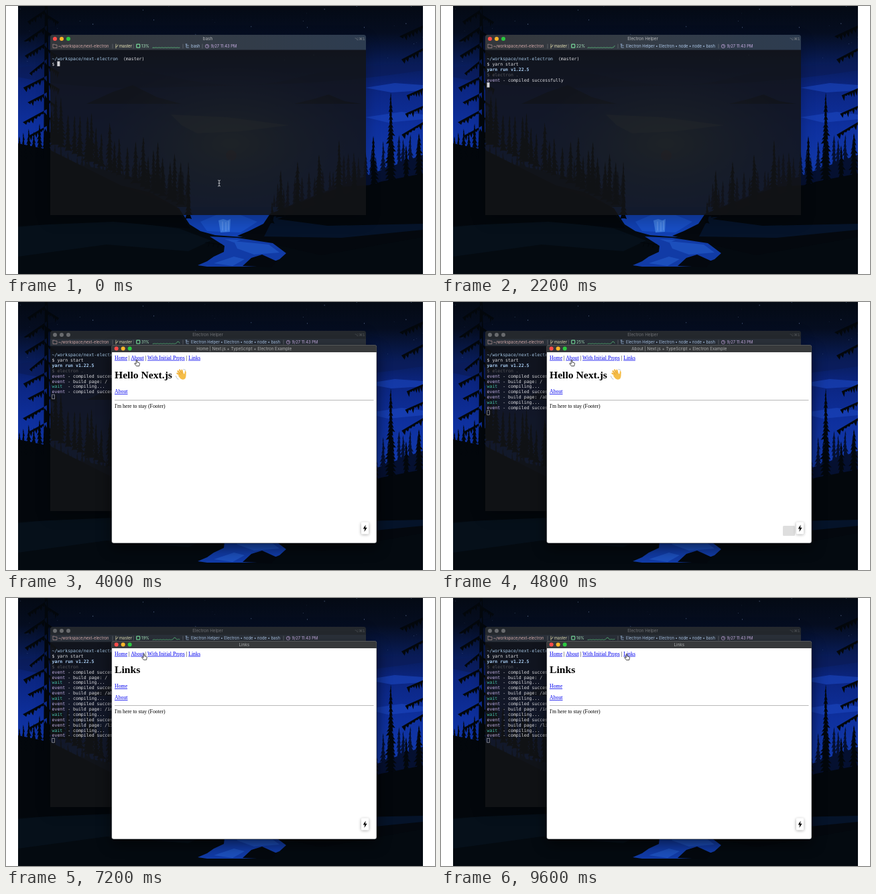
Write an HTML page that moves like this. It is 640 px wide and 400 px high and loops after 9.8 s.

```html
<!DOCTYPE html>
<html lang="en">
<head>
<meta charset="utf-8">
<title>Desktop app demo</title>
<style>
html, body { margin: 0; width: 100%; height: 100%; overflow: hidden; background: #fff; }
svg { display: block; width: 640px; height: 400px; }
text { white-space: pre; }
.ui { font: 6.25px Inter, sans-serif; }
.bar { font: 5.85px Inter, sans-serif; }
.keys { font: 5.6px "DejaVu Sans", sans-serif; }
.mono { font: 6.56px "DejaVu Sans Mono", monospace; fill: #dcdce0; }
.page { font: 7.82px "Liberation Serif", Times, serif; fill: #000; }
.h1 { font: bold 15.64px "Liberation Serif", Times, serif; fill: #000; }
.link { fill: #0000ee; text-decoration: underline; }
.b { font-weight: bold; }
.mid { text-anchor: middle; }
</style>
</head>
<body>
<svg viewBox="0 0 640 400">
  <defs>
    <linearGradient id="sky" x2="0" y2="1">
      <stop offset="0" stop-color="#040a14"/>
      <stop offset=".1" stop-color="#050d20"/>
      <stop offset=".2" stop-color="#081a50"/>
      <stop offset=".3" stop-color="#0b2580"/>
      <stop offset=".45" stop-color="#0e309e"/>
      <stop offset=".8" stop-color="#1644ba"/>
    </linearGradient>
    <linearGradient id="title">
      <stop offset="0" stop-color="#34373b"/>
      <stop offset=".5" stop-color="#343c46"/>
      <stop offset="1" stop-color="#2d3c50"/>
    </linearGradient>
    <radialGradient id="glow">
      <stop offset="0" stop-color="#7b9484" stop-opacity=".75"/>
      <stop offset="1" stop-color="#54707c" stop-opacity="0"/>
    </radialGradient>
    <filter id="soft" x="-30%" y="-30%" width="160%" height="160%"><feGaussianBlur stdDeviation="11"/></filter>
    <filter id="near" x="-60%" y="-60%" width="220%" height="220%"><feGaussianBlur stdDeviation="2"/></filter>
    <clipPath id="desk"><path d="M18 0H622V400H18Z"/></clipPath>
    <clipPath id="outside"><path clip-rule="evenodd" d="M18 0H622V400H18ZM66 43H537V312H66Z"/></clipPath>
  </defs>
  <g clip-path="url(#desk)">
    <g id="wall"></g>
    <g clip-path="url(#outside)"><rect x="66" y="51" width="471" height="268" opacity=".25" filter="url(#soft)"/></g>
    <g id="term"></g>
    <g id="app"></g>
    <g id="mouse"></g>
  </g>
</svg>
<script>
const LOOP = 9800, STEP = 200;
const $ = id => document.getElementById(id);
const text = (x, y, s, cls, fill) =>
  `<text x="${x}" y="${y}" class="${cls}"${fill ? ` style="fill:${fill}"` : ''}>${s}</text>`;
const span = (s, fill, cls = '') => `<tspan class="${cls}"${fill ? ` style="fill:${fill}"` : ''}>${s}</tspan>`;
const path = (d, fill, extra = '') => `<path d="${d}" fill="${fill}" ${extra}/>`;
const line = (d, color, w = .7) => path(d, 'none', `stroke="${color}" stroke-width="${w}" stroke-linecap="round" stroke-linejoin="round"`);
const rect = (x, y, w, h, fill, extra = '') => `<rect x="${x}" y="${y}" width="${w}" height="${h}" fill="${fill}" ${extra}/>`;
const dot = (x, y, r, fill) => `<circle cx="${x}" cy="${y}" r="${r}" fill="${fill}"/>`;
// Latest value in a list of [time, value]
const at = (keys, t) => keys.filter(k => k[0] <= t).pop()[1];

function random(seed) {
  return () => (seed = seed * 16807 % 2147483647) / 2147483647;
}

// ---- wallpaper ----
const DARK = '#03070c';

function tree(x, top, foot, half, rnd) {
  const n = Math.max(5, Math.round((foot - top) / 6)), left = [], right = [];
  for (let k = 1; k <= n; k++) {
    const y = top + (foot - top) * k / n, r = half * (k / n) ** .8;
    const a = r * (.5 + rnd() * .7), b = r * (.5 + rnd() * .7);
    left.push(`${(x - a).toFixed(1)} ${y.toFixed(1)}`, `${(x - a * .4).toFixed(1)} ${(y - 1).toFixed(1)}`);
    right.unshift(`${(x + b * .4).toFixed(1)} ${(y - 1).toFixed(1)}`, `${(x + b).toFixed(1)} ${y.toFixed(1)}`);
  }
  return `M${x.toFixed(1)} ${top.toFixed(1)}L${left.join('L')}L${right.join('L')}Z`;
}

function forest(x0, x1, ground, h, gap, fill, seed) {
  const rnd = random(seed);
  let d = '';
  for (let x = x0; x < x1; x += gap * (.6 + rnd() * .8)) {
    const tall = h * (.6 + rnd() * .6), y = ground(x);
    d += tree(x, y - tall, y + 14, 3 + tall * .09, rnd);
  }
  return path(d, fill);
}

// Drooping branch with ragged needles below
function bough(x, y, dx, dy, rnd) {
  let d = `M${x} ${y}L${x + dx} ${y + dy}`;
  for (let k = 6; k > 0; k--) {
    const px = x + dx * k / 7, py = y + dy * k / 7;
    d += `L${px.toFixed(1)} ${(py + 4 + rnd() * 7).toFixed(1)}L${(px - dx * .05).toFixed(1)} ${(py + 2).toFixed(1)}`;
  }
  return d + `L${x} ${y + 9}Z`;
}

function wallpaper() {
  const rnd = random(77);
  let s = rect(18, 0, 604, 400, 'url(#sky)');
  for (let i = 0; i < 46; i++)
    s += dot(18 + rnd() * 604, rnd() ** 1.6 * 105, .25 + rnd() * .4, `rgba(150,180,230,${.25 + rnd() * .5})`);
  s += path('M18 92Q130 78 240 104T430 108T622 86V96Q520 112 420 116T210 122T18 106Z', '#0a1c58', 'opacity=".6"');
  s += path('M120 146L160 128L189 118L225 136L262 146ZM430 146L462 138L481 132L505 142L530 146Z', '#051030', 'opacity=".8"');
  s += path('M536 122L580 115L622 118V126L575 129ZM536 166L590 158L622 162V169L570 174Z', '#1b46c0', 'opacity=".6"');
  s += '<ellipse cx="335" cy="205" rx="200" ry="115" fill="url(#glow)"/>';
  s += path('M246 162L330 166L422 178L350 187L285 190L262 178Z', '#9aab9b', 'opacity=".35"');
  s += dot(336, 223, 8, 'rgba(150,90,85,.35)');
  s += forest(18, 275, x => 230 + (x - 18) * .2, 30, 7, '#071434', 9);
  s += path('M18 225Q150 235 275 285V330H18Z', '#071434');
  s += forest(400, 622, x => 302 - (x - 400) * .36, 36, 8, '#051030', 31);
  s += path('M390 312Q450 285 622 222V320H390Z', '#051030');

  // Waterfall and river
  s += path('M255 300H410V350H255Z', '#1140b2');
  s += path('M290 322L318 310L350 312L375 322L350 338L300 336Z', '#1c55cc', 'opacity=".7"');
  s += path('M317 320L324 318L330 320L335 318L334 337L320 338Z', '#3b78de');
  s += line('M323 322V335M328 323V336M332 321V334', '#6f9fee', .8);
  s += path('M18 262L130 258L215 278L258 302L274 326L290 336L312 342L420 350L622 330V400H18Z', '#040a10');
  s += path('M394 310L384 325L362 336L345 343L470 372L622 345V262L500 270Z', '#04080e');
  s += path('M400 314H540L622 320V334L500 346L385 344Z', '#061732', 'opacity=".75"');
  s += path('M18 330L140 318L258 332L306 350L272 366L150 356L18 374Z', '#06101a');
  s += path('M304 344L345 346L398 354L418 369L408 378L380 389L300 389L286 387L300 381L310 374L325 367L326 358Z', '#113ba6');
  s += path('M340 351L392 356L408 368L370 371L345 362ZM310 384L340 374L356 378L338 388ZM326 348L350 349L340 353Z', '#2257c6', 'opacity=".7"');
  s += path('M353 388L366 376L382 371L404 381L396 390Z', '#04080e');
  s += line('M298 353L322 356M302 358L303 353M309 359L310 354M316 360L317 355', DARK, 1.2);

  // Near trees
  s += forest(68, 266, x => 190 + (x - 66) * .48, 58, 9, DARK, 15);
  const firs = [[272, 232, 318, 6], [410, 245, 316, 8], [435, 232, 318, 10], [467, 222, 318, 12], [397, 292, 325, 4],
    [497, 200, 318, 11], [520, 234, 318, 11], [548, 194, 300, 11], [574, 129, 300, 12], [597, 208, 300, 12], [616, 190, 300, 14]];
  for (const [x, top, foot, half] of firs) s += path(tree(x, top, foot, half, rnd), DARK);
  s += path('M18 205L66 215L180 272L250 298L275 332L160 322L18 328ZM622 250L560 262L480 290L405 318L480 328L622 325Z', DARK);
  s += forest(20, 66, () => 215, 34, 8, DARK, 5);

  // Branches framing both edges
  let frame = 'M58 0L62 0L66 230H56Z';
  for (let y = 4; y < 200; y += 25) frame += bough(61, y, -24 - rnd() * 12, 14 + rnd() * 10, rnd) + bough(60, y + 8, 14 + rnd() * 8, 12, rnd);
  for (const y of [28, 62, 122, 148, 172]) frame += bough(624, y, -22 - rnd() * 16, 10 + rnd() * 10, rnd);
  return s + path(frame, DARK);
}

// ---- terminal ----
const OPEN = 2600, ROW = 7.9, CHAR = 3.95;
const cpu = [[0, 13], [1000, 22], [2600, 46], [3800, 31], [4600, 25], [5800, 18], [7000, 19], [8000, 17], [9200, 16]];
const output = [
  [1200, span('yarn run v1.22.5', '#a9cdf2', 'b')],
  [1400, span('$ electron .', '#56565c')],
  [2200, 'event', 'compiled successfully'],
  [2600, 'event', 'build page: /'],
  [2600, 'wait ', 'compiling...'],
  [2800, 'event', 'compiled successfully'],
  [4200, 'event', 'build page: /about'],
  [4200, 'wait ', 'compiling...'],
  [4600, 'event', 'compiled successfully'],
  [5400, 'event', 'build page: /initial-props'],
  [5400, 'wait ', 'compiling...'],
  [5600, 'event', 'compiled successfully'],
  [6400, 'event', 'build page: /links'],
  [6400, 'wait ', 'compiling...'],
  [6800, 'event', 'compiled successfully']
];

function lights(x, y, on) {
  return ['#fc4b48', '#fdb528', '#2bc840'].map((c, i) => dot(x + i * 10, y, 3, on ? c : '#696b6e')).join('');
}

function spark(t) {
  let d = 'M219 62.7';
  for (let i = 0; i <= 24; i++) {
    const s = Math.floor(t / 1000) + i - 24;
    const load = .35 + .3 * Math.sin(s * 2.3) + 4 * Math.exp(-((s - 2.4) ** 2) / .7) + (s > 2 ? .5 : 0);
    d += `L${(219 + i * 1.67).toFixed(1)} ${(62.5 - load).toFixed(1)}`;
  }
  return line(d, '#63cf86', .7);
}

function statusBar(t) {
  const busy = t >= 1600, end = busy ? 414 : 293;
  let s = rect(66, 55, 471, 10.5, t < OPEN ? 'url(#title)' : '#2b313a');
  s += line('M70 58V62.5H76V58H73L72.3 57.2H70Z', '#c8a3a3', .6) + text(78, 62, '~/workspace/next-electron', 'bar', '#d3a9a8');
  s += line('M164 57V63M164 61Q167 61 167 58', '#e6dfad', .7) + text(169, 62, 'master', 'bar', '#f0ebbd');
  s += rect(194.7, 57.2, 5, 5, 'none', 'rx=".7" stroke="#78d99a" stroke-width="1.2"');
  s += text(202, 62, at(cpu, t) + '%', 'bar', '#b1efc5') + spark(t);
  s += line('M269 57V62H272.5M269 59H272.5M268 57H270', '#a4c1e6', .7);
  s += text(276, 62, busy ? 'Electron Helper • Electron • node • node • bash' : 'bash', 'bar', '#afc9ea');
  s += `<circle cx="${end + 7}" cy="60" r="2.7" fill="none" stroke="#c5a5dd" stroke-width=".7"/>`;
  s += line(`M${end + 7} 58.4V60H${end + 8.3}`, '#c5a5dd', .6) + text(end + 12.5, 62, '9/27 11:43 PM', 'bar', '#cdb2e8');
  for (const x of [159, 190, 264, end]) s += line(`M${x} 57V63`, '#777b80', .6);
  return s;
}

function terminal(t) {
  const active = t < OPEN, typed = 'yarn start'.slice(0, Math.round(t / 100));
  let s = rect(66, 64, 471, 248, '#131417', 'opacity=".86"');
  s += path('M66 56V46.5Q66 43 69.5 43H533.5Q537 43 537 46.5V56Z', active ? 'url(#title)' : '#24282d');
  s += lights(73, 49, active);
  s += text(301, 51.4, t < 1600 ? 'bash' : 'Electron Helper', 'ui mid', active ? '#b9bbbe' : '#707276');
  s += text(520, 51, '⌥⌘1', 'keys', active ? '#85888c' : '#55585c') + statusBar(t);

  const rows = [span('~/workspace/next-electron', '#a8c9e8') + '  (master)', '$ ' + typed];
  for (const [when, tag, msg] of output) if (t >= when)
    rows.push(msg ? span(tag, tag === 'event' ? '#c3b1e4' : '#48bca7') + ' - ' + msg : tag);
  s += rows.map((r, i) => text(68.5, (81 + i * ROW).toFixed(1), r, 'mono')).join('');
  const prompt = rows.length === 2;
  const x = 68.5 + (prompt ? (2 + typed.length) * CHAR : 0);
  const y = 74.6 + (prompt ? 1 : rows.length) * ROW;
  return s + (active
    ? rect(x, y, 4, 7.4, '#d4d4d8')
    : rect(x + .3, y + .4, 3.5, 6.5, 'none', 'stroke="#b8b8bc" stroke-width=".6"'));
}

// ---- app window ----
const SUFFIX = ' | Next.js + TypeScript + Electron Example';
const people = ['Emily', 'Tim', 'Beatrice', 'Paul'];
const para = (y, s, link) => text(162, y, s, link ? 'page link' : 'page');
const footer = y => rect(162, y, 386.5, .6, '#8a8a8a') + para(y + 11.8, "I'm here to stay (Footer)");
const heading = (s, y = 112.3) => text(162, y, s, 'h1');

const wave = line('M262 110L255.5 106.5M262 109L256.5 103.3M263 108L259 101.5M264 108L262.3 101.8', '#f2b640', 2.3)
  + path('M257 110L261 105L266.2 107.5L267 102.6Q269.3 103 268.6 107.5Q269 116 263.6 115.8Q260 115.4 257 110Z', '#f5bd47')
  + line('M260.5 108.5L257.6 105.6M262.5 107L260 103.2', '#cf8c2e', .4)
  + line('M253.4 110.5Q254 114 257 115.4M264.8 100.6Q267 100.7 268 102', '#9aa8ae', .7);

const pages = {
  home: heading('Hello Next.js', 113.5) + wave + para(136.2, 'About', 1) + footer(146.3),
  about: heading('About') + para(134, 'This is the about page') + para(151, 'Go home', 1) + footer(160.4),
  list: heading('List Example (as Function Component)') + para(134, 'You are currently on: /initial-props')
    + people.map((p, i) => dot(175.5, 148.4 + i * 8.85, 1.3, '#000') + text(181.5, 150.7 + i * 8.85, `${101 + i}: ${p}`, 'page link')).join('')
    + para(194, 'Go home', 1) + footer(204.2),
  links: heading('Links') + para(134, 'Home', 1) + para(151, 'About', 1) + footer(160.4)
};
const titles = { home: 'Home' + SUFFIX, about: 'About' + SUFFIX, list: 'List Example (as Function Component)' + SUFFIX, links: 'Links' };
const route = [[0, 'home'], [5000, 'about'], [5800, 'list'], [7000, 'links'], [7800, 'home'], [8600, 'about'], [9000, 'list'], [9400, 'links']];
const nav = ['Home', 'About', 'With Initial Props', 'Links'].map(s => span(s, '', 'link')).join(' | ');

function app(t) {
  if (t < OPEN) return '';
  const page = at(route, t), title = t === 4800 ? 'about' : page;
  let s = rect(158, 74, 395, 292, '#000', 'opacity=".62" filter="url(#soft)"');
  s += rect(157.6, 64.3, 395.4, 295.7, '#fff', 'rx="3" stroke="#17191b" stroke-width=".6"');
  s += path('M157.7 75V67.5Q157.7 64.4 161 64.4H549.6Q552.9 64.4 552.9 67.5V75Z', '#37393b');
  s += lights(164.7, 69.6, true) + text(355.3, 71.9, titles[title], 'ui mid', '#adafb1');
  s += text(162, 85.7, nav, 'page') + pages[page];
  if (t === 4600 || t === 4800) s += rect(510, 334, 18, 15, '#dedede', 'rx="1.5"');
  s += rect(529.5, 329.5, 12, 18, '#000', 'rx="2" opacity=".3" filter="url(#near)"');
  s += rect(530, 328.5, 11.2, 18, '#fff', 'rx="1.6"');
  return s + path('M536.6 332.6L532.7 338.6H535.2L534.5 343L538.7 336.7H536Z', '#000');
}

// ---- pointer ----
const moves = [[3000, 318, 263], [3400, 300, 230], [4000, 195, 86], [4800, 195, 86], [5200, 236, 84], [5600, 240, 84], [6000, 288, 82],
  [6800, 288, 82], [7400, 177, 83], [8200, 177, 83], [8600, 196, 83], [9000, 236, 83], [9400, 277, 83]];

function pointer(t) {
  if (t < 200) return line('M316.4 260Q318 260 318 261.2V267.8Q318 269 316.4 269M319.6 260Q318 260 318 261.2M318 267.8Q318 269 319.6 269M317 264.5H319', '#c6c8cc', .9);
  if (t < OPEN) return '';
  const i = moves.findIndex(m => m[0] > t);
  const b = moves.at(i), a = i > 0 ? moves[i - 1] : b;
  const k = a === b ? 0 : (t - a[0]) / (b[0] - a[0]), e = k * k * (3 - 2 * k);
  const x = a[1] + (b[1] - a[1]) * e, y = a[2] + (b[2] - a[2]) * e;
  const link = y < 88 && [[162, 181], [186, 206], [211, 268], [273, 291]].some(r => x >= r[0] && x <= r[1]);
  const shape = link
    ? path('M-.8 .8Q0-.2 .8 .8V4L3.8 4.7Q4.6 5 4.4 6.2L3.7 9.6H-.4L-3.2 6.2Q-3.4 5.2-2.3 5.3L-.8 6.4Z', '#fff', 'stroke="#000" stroke-width=".7" stroke-linejoin="round"')
    : path('M0 0V8L1.8 6.4L3 9.2L4.2 8.6L3 6H5.4Z', '#000', 'stroke="#fff" stroke-width=".6"');
  return `<g transform="translate(${x.toFixed(1)} ${y.toFixed(1)})">${shape}</g>`;
}

let last = -1;
function frame() {
  const t = Math.floor(performance.now() % LOOP / STEP) * STEP;
  if (t !== last) {
    last = t;
    $('term').innerHTML = terminal(t);
    $('app').innerHTML = app(t);
    $('mouse').innerHTML = pointer(t);
  }
  requestAnimationFrame(frame);
}
$('wall').innerHTML = wallpaper();
frame();
</script>
</body>
</html>
```
